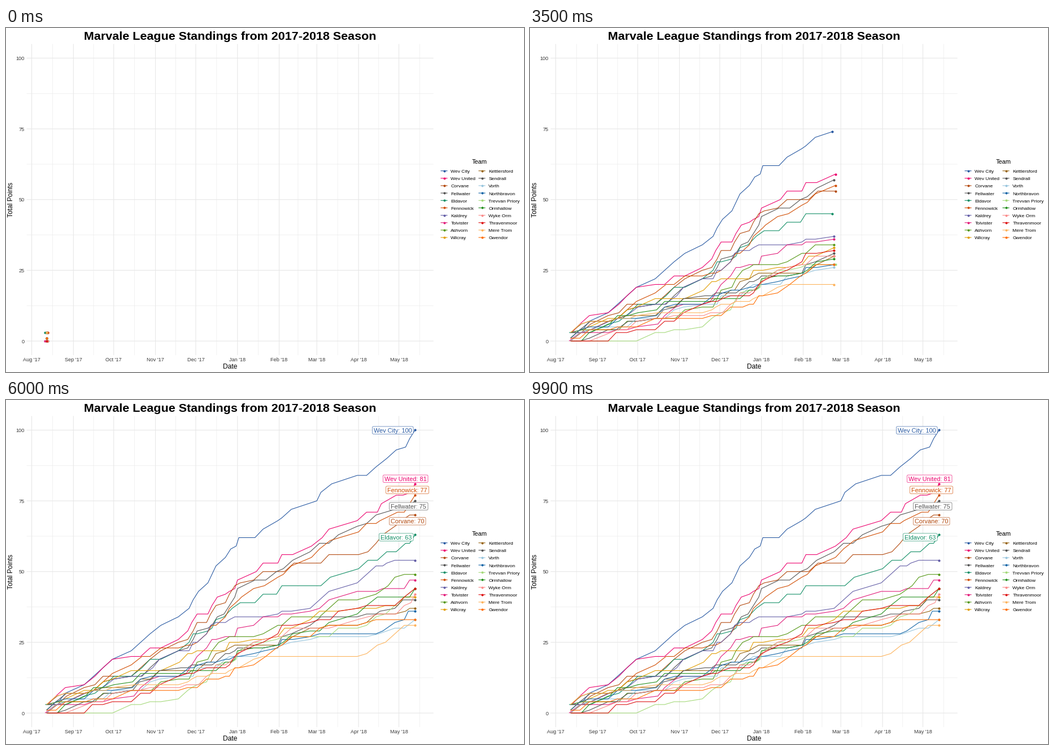
Animation, 917 px wide and 611 px high, one loop 10000 ms. Source, as a matplotlib script:

```python
import numpy as np
import matplotlib.pyplot as plt
from matplotlib.animation import FuncAnimation
from matplotlib.colors import to_rgb
from matplotlib.patches import FancyBboxPatch

W, H, DPI = 917, 611, 100
FRAMES, REVEAL, WEEKS = 100, 49, 39
PX = 72 / DPI  # points per pixel

plt.rcParams["font.family"] = "Liberation Sans"
fig = plt.figure(figsize=(W / DPI, H / DPI), dpi=DPI, facecolor="white")
ax = fig.add_axes([0, 0, 1, 1])
ax.set(xlim=(0, W), ylim=(H, 0))
ax.axis("off")


def tone(color):
    return tuple(np.array(to_rgb(color)) ** 1.22)


def day_x(day):
    return 45.5 + 2.381 * np.asarray(day)


def pts_y(points):
    return 556 - 5.025 * np.asarray(points)


def label(x, y, text, px, color="black", ha="center", **kw):
    """Text whose capitals are centred on y."""
    return ax.text(x, y + 0.36 * px, text, fontsize=px * PX, color=color,
                   ha=ha, va="baseline", **kw)


# Days are counted from 1 August.
MATCHDAYS = np.array([
    11, 18, 25, 39, 46, 53, 60, 74, 81, 88, 95, 109, 116, 120, 123, 130, 134,
    137, 144, 147, 151, 153, 165, 172, 183, 186, 193, 207, 214, 221, 228, 242,
    249, 256, 263, 270, 277, 285])
SCORE = {"W": 3, "D": 1, "L": 0}


class Team:
    def __init__(self, name, color, form, moved):
        """form: results by round; moved: {days later: rounds}."""
        self.name, self.color = name, tone(color)
        days = MATCHDAYS.copy()
        for shift, rounds in moved.items():
            days[np.array(rounds) - 1] += shift
        order = np.argsort(days, kind="stable")
        gains = np.array([SCORE[r] for r in form.replace(" ", "")])[order]
        days = days[order]
        self.path = np.column_stack([day_x(days), pts_y(np.cumsum(gains))])
        self.keys = np.round((days - 7) // 7 * REVEAL / WEEKS)

    def trail(self, f):
        k = np.searchsorted(self.keys, f, side="right")
        if k == len(self.keys):
            return self.path
        t = (f - self.keys[k - 1]) / (self.keys[k] - self.keys[k - 1])
        a, b = self.path[k - 1], self.path[k]
        return np.vstack([self.path[:k], a + (b - a) * t])


teams = [
    Team("Wev City", "#386CB0", "WDWWWWWWWW WWWWWWWWWW DWLWWDWWWW WWLWWWDW",
         {1: [11, 13, 15, 16, 20, 21, 22, 23, 29, 35, 36, 37], 2: [2, 30],
          5: [28], 53: [31]}),
    Team("Wev United", "#F0027F", "WWWDWWWDLW LWWWWLWWDD DWWWLWLWWW DWWLWWLW",
         {1: [1, 5, 11, 16, 18, 27, 28, 34, 36], 2: [23, 29], -1: [14, 37],
          54: [31], -3: [35]}),
    Team("Corvane", "#BF5B17", "LWWWDWLLWW WWDWWLWWDW WDDWLLWLLW WLDWDWWL",
         {1: [2, 3, 5, 11, 28, 29, 32, 33, 37], 2: [22, 26, 27], -1: [17],
          33: [31], 18: [35]}),
    Team("Fellwater", "#666666", "DWWLDWDDLW WWDWWDDWDW WWWLWDWWWL WWDWDDLW",
         {1: [3, 7, 9, 16, 18, 23, 26, 27, 37], 2: [24], -1: [19, 25]}),
    Team("Eldavor", "#1B9E77", "WLLWDWWLWW LWWWLDDWDW DDLWLWLLLW LWWLWLWW",
         {1: [3, 5, 7, 9, 11, 13, 16, 21, 23, 29, 30, 32, 33, 34, 35, 36, 37],
          2: [6, 20, 22], -1: [1, 19, 25], 5: [28], 53: [31]}),
    Team("Fennowick", "#D95F02", "WLDWDWWWWL WLDLDWWLWW DWWDWDWWWW WWWLDWLW",
         {1: [1, 2, 3, 9, 11, 22, 24, 26, 28, 30, 32], 2: [36], -1: [14],
          5: [21], 53: [31], -4: [35]}),
    Team("Kaldrey", "#7570B3", "WLDWDDWDLW WWLWLWWDLD DLLLDDLDWW LWWWDDLL",
         {1: [3, 4, 7, 13, 35, 37], 2: [10], -1: [17], 33: [31]}),
    Team("Tolvister", "#E7298A", "LWLLDLDDWW DLDWWWWLDL LWDWLDLDDW WWLLDLLL",
         {1: [10], 2: [8], -1: [1, 13, 14], 53: [31], -2: [35]}),
    Team("Ashvorn", "#66A61E", "WDLLLWLDLL WDLWWDWWDD LLLDWLWLLW WLDDWWDL",
         {1: [3, 5, 7, 8, 9, 10, 11, 13, 16], 2: [2, 18, 35]}),
    Team("Wilcray", "#E6AB02", "DWDWLWDWLL LWWLDLLLLW LLDLDWLWWL LDLLDLWL",
         {1: [11, 12, 22, 30], 2: [26, 36], -1: [14, 17]}),
    Team("Kettlersford", "#A6761D", "WWDLDDLLWL WLLLLWLWDD DLLLLLWWLD LLDWDLDL",
         {1: [2, 13, 27, 37], 2: [4], -1: [17, 25], 18: [35]}),
    Team("Sendrall", "#666666", "LLDWLWLDWD WDLDLLLDWL DDLLDWDWWL LLDLDDWL",
         {1: [6, 7, 8, 10, 29], 2: [12], -1: [5, 9, 14, 37], 53: [31],
          -4: [35]}),
    Team("Vorth", "#A6CEE3", "LWDDLLWLLW DDLLWLLLWD LLLWDLDDDL LLLDDDLW",
         {1: [3, 32, 35], 2: [12, 23, 30, 34], -1: [17]}),
    Team("Northbravon", "#1F78B4", "DWDLWLLDWD LLWLDDLLDL DLDDDWLDDL WLLLDWDL",
         {1: [8, 10, 13, 15, 16, 22, 24, 27, 33], 52: [31], -2: [35]}),
    Team("Trevvan Priory", "#B2DF8A",
         "LLLLLLLWLD LDWDDDWWDL DWWLDDLLLL WLDWDWWW",
         {1: [4, 11, 21, 22, 26, 28], 2: [20, 29], -1: [14, 17, 25]}),
    Team("Ormhallow", "#33A02C", "LLWWWLDDWL LLLDLLLLWL DWDLDDWDLW LWWWLLLW",
         {1: [1, 2, 4, 6, 7, 8, 20, 26, 27, 34], 2: [10, 35], -1: [14],
          53: [31]}),
    Team("Wyke Orm", "#FB9A99", "LLLWDLWDLD LLDLLWDWLD DWWDDLWLLL DWDDLLWW",
         {1: [1, 12, 15, 22, 33, 35, 36], 2: [4, 34], -1: [9, 13, 25],
          5: [21], 54: [31]}),
    Team("Thravenmoor", "#E31A1C", "LLLLWLDLWL WWDLDDLLLD WDWDWWLDDL WDDLLLWW",
         {1: [15, 18, 23, 27, 30], -1: [5], -3: [35]}),
    Team("Mere Trom", "#FDBF6F", "WWDLDLDDLL LLDDDLDLLD DLWDLLLLLL LLDWDWWL",
         {1: [3, 18, 21, 22, 34], 2: [6, 8, 27], -1: [14]}),
    Team("Gwendor", "#FF7F00", "DLWLDLLWLL LLDLLWLLDL WLDWWDWLWD LLDDLLLL",
         {1: [4, 22, 35], 2: [18, 24], -1: [25], 52: [31]}),
]

# Grid and axes
LEFT, RIGHT, TOP, BOTTOM = 36.6, 756.7, 28.4, 581.1
GRID, TICK = tone("#EBEBEB"), tone("#4D4D4D")


def grid(x, y, width):
    ax.plot(x, y, color=GRID, lw=width * PX, zorder=1, snap=False,
            solid_capstyle="butt")


months = ["Aug '17", "Sep '17", "Oct '17", "Nov '17", "Dec '17", "Jan '18",
          "Feb '18", "Mar '18", "Apr '18", "May '18"]
starts = np.cumsum([0, 31, 30, 31, 30, 31, 31, 28, 31, 30, 31])
for x in day_x((starts[:-1] + starts[1:]) / 2):
    grid([x, x], [TOP, BOTTOM], 0.55)
for y in pts_y(np.arange(12.5, 100, 25)):
    grid([LEFT, RIGHT], [y, y], 0.55)
for x, name in zip(day_x(starts), months):
    grid([x, x], [TOP, BOTTOM], 1.1)
    label(x, 588.7, name, 9.2, TICK)
for p in range(0, 101, 25):
    y = pts_y(p)
    grid([LEFT, RIGHT], [y, y], 1.1)
    label(33, y + 0.3, str(p), 9.2, TICK, "right")

label(396.5, 13, "Marvale League Standings from 2017-2018 Season", 21.5,
      weight="bold")
label(396.5, 601, "Date", 12)
ax.text(9, 305, "Total Points", fontsize=12 * PX, rotation=90,
        ha="center", va="center")

# Legend
label(838.5, 237, "Team", 11)
for i, team in enumerate(teams):
    x, y = 770 + 67 * (i // 10), 253.7 + 13.15 * (i % 10)
    ax.plot([x, x + 11], [y, y], color=team.color, lw=1.1 * PX, snap=False)
    ax.plot(x + 5.5, y, "o", color=team.color, ms=4 * PX, mew=0)
    label(x + 17.3, y + 0.3, team.name, 8.5, ha="left")

# Moving lines and heads
lines = [ax.plot([], [], color=t.color, lw=1.1 * PX, zorder=3,
                 solid_joinstyle="round", solid_capstyle="butt")[0]
         for t in teams]
heads = [ax.plot([], [], "o", color=t.color, ms=4.2 * PX, mew=0, zorder=4)[0]
         for t in teams]

# Final callouts: team, total, left, right, centre
callouts = []
for i, total, x0, x1, y in [(0, 100, 648.5, 721, 53.7),
                            (1, 81, 667.5, 747, 139.8),
                            (5, 77, 672.5, 748.5, 159.7),
                            (3, 75, 678.5, 747, 188.7),
                            (2, 70, 678.5, 743, 215.3),
                            (4, 63, 660.5, 721, 243.6)]:
    color = teams[i].color
    box = FancyBboxPatch((x0, y - 6.7), x1 - x0, 13.4, fc="white", ec=color,
                         lw=0.6 * PX, zorder=5,
                         boxstyle="round,pad=0,rounding_size=2")
    callouts += [ax.add_patch(box),
                 label((x0 + x1) / 2, y + 0.2, f"{teams[i].name}: {total}",
                       10.9, color, zorder=6)]


def update(f):
    f = min(f, REVEAL)
    for team, line, head in zip(teams, lines, heads):
        trail = team.trail(f)
        line.set_data(trail[:, 0], trail[:, 1])
        head.set_data(trail[-1:, 0], trail[-1:, 1])
    for artist in callouts:
        artist.set_visible(f == REVEAL)
    return lines + heads + callouts


anim = FuncAnimation(fig, update, frames=FRAMES, interval=100, repeat=True,
                     repeat_delay=0, blit=False)
plt.show()
```
